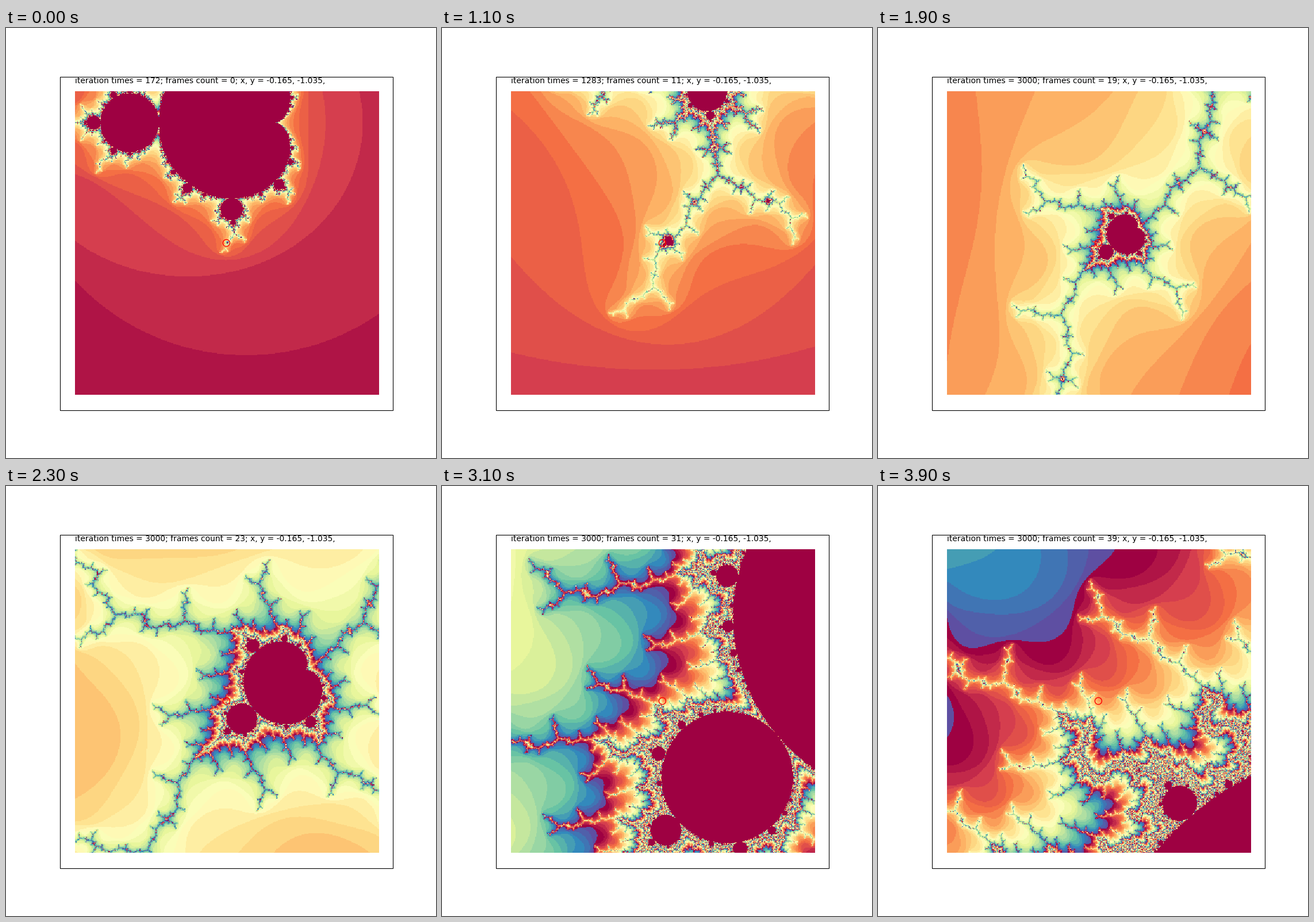
A matplotlib script for the animation above (4000 ms loop, 748x748 px).

```python
import numpy as np
import matplotlib.pyplot as plt
from matplotlib.animation import FuncAnimation
from matplotlib.patches import Circle, Rectangle

SIZE, DPI = 748, 100
FRAMES, INTERVAL = 40, 100
GRID = 400            # fractal cells per side
CX, CY = -0.1648, -1.035
ZOOM = 1.2
HALF_WIDTH = 2.25 / ZOOM ** 3
LEVELS = 30           # the colours repeat after this many iterations
CHUNK = 12            # iterations between two clean-ups of the point list


def iteration_limit(n):
    return min(3000, int(100 * ZOOM ** (n + 3)))


def escape_levels(n):
    """Escape counts of the Mandelbrot set, folded into the colour levels."""
    limit = iteration_limit(n)
    half = HALF_WIDTH / ZOOM ** n
    offset = np.linspace(-half, half, GRID)
    c = ((CX + offset)[None, :] + 1j * (CY - offset)[:, None]).ravel()
    levels = np.zeros(c.size, np.uint8)
    index = np.arange(c.size)
    z = np.zeros_like(c)
    ref = z.copy()
    done, chunk, next_ref = 0, 0, 1

    while done < limit and index.size:
        steps = min(CHUNK, limit - done)
        inside = np.zeros(index.size, np.uint8)
        for _ in range(steps):
            z = z * z + c
            inside += z.real ** 2 + z.imag ** 2 <= 4
        escaped = inside < steps
        levels[index[escaped]] = (done + inside[escaped].astype(int) + 1) % LEVELS
        done += steps
        chunk += 1

        # Orbits that settle into a cycle never escape, so drop them early.
        gap = z - ref
        keep = ~escaped & (gap.real ** 2 + gap.imag ** 2 > 1e-10)
        index, z, c, ref = index[keep], z[keep], c[keep], ref[keep]
        if chunk == next_ref:
            ref = z.copy()
            next_ref *= 2
    return levels.reshape(GRID, GRID)


with np.errstate(all="ignore"):
    views = [escape_levels(n) for n in range(FRAMES)]

plt.rcParams["font.family"] = "DejaVu Sans"
fig = plt.figure(figsize=(SIZE / DPI, SIZE / DPI), dpi=DPI, facecolor="white")
ax = fig.add_axes([0, 0, 1, 1])
ax.axis("off")

image = ax.imshow(views[0], cmap="Spectral", vmin=0, vmax=LEVELS - 1,
                  extent=(120, 649, 638, 110), interpolation="nearest",
                  aspect="auto")
ax.add_patch(Rectangle((94, 85), 579, 580, fill=False,
                       edgecolor="black", linewidth=0.8))
ax.add_patch(Circle((383.35, 374), 6, fill=False, edgecolor="red",
                    linewidth=1.0))
label = ax.text(119.85, 96, "", fontsize=10, va="baseline", ha="left")
ax.set_xlim(0, SIZE)
ax.set_ylim(SIZE, 0)


def update(n):
    image.set_data(views[n])
    label.set_text(f"iteration times = {iteration_limit(n)}; frames count = {n}; "
                   f"x, y = {CX:.3f}, {CY:.3f},")
    return image, label


anim = FuncAnimation(fig, update, frames=FRAMES, interval=INTERVAL,
                     repeat=True, repeat_delay=0)
plt.show()
```
